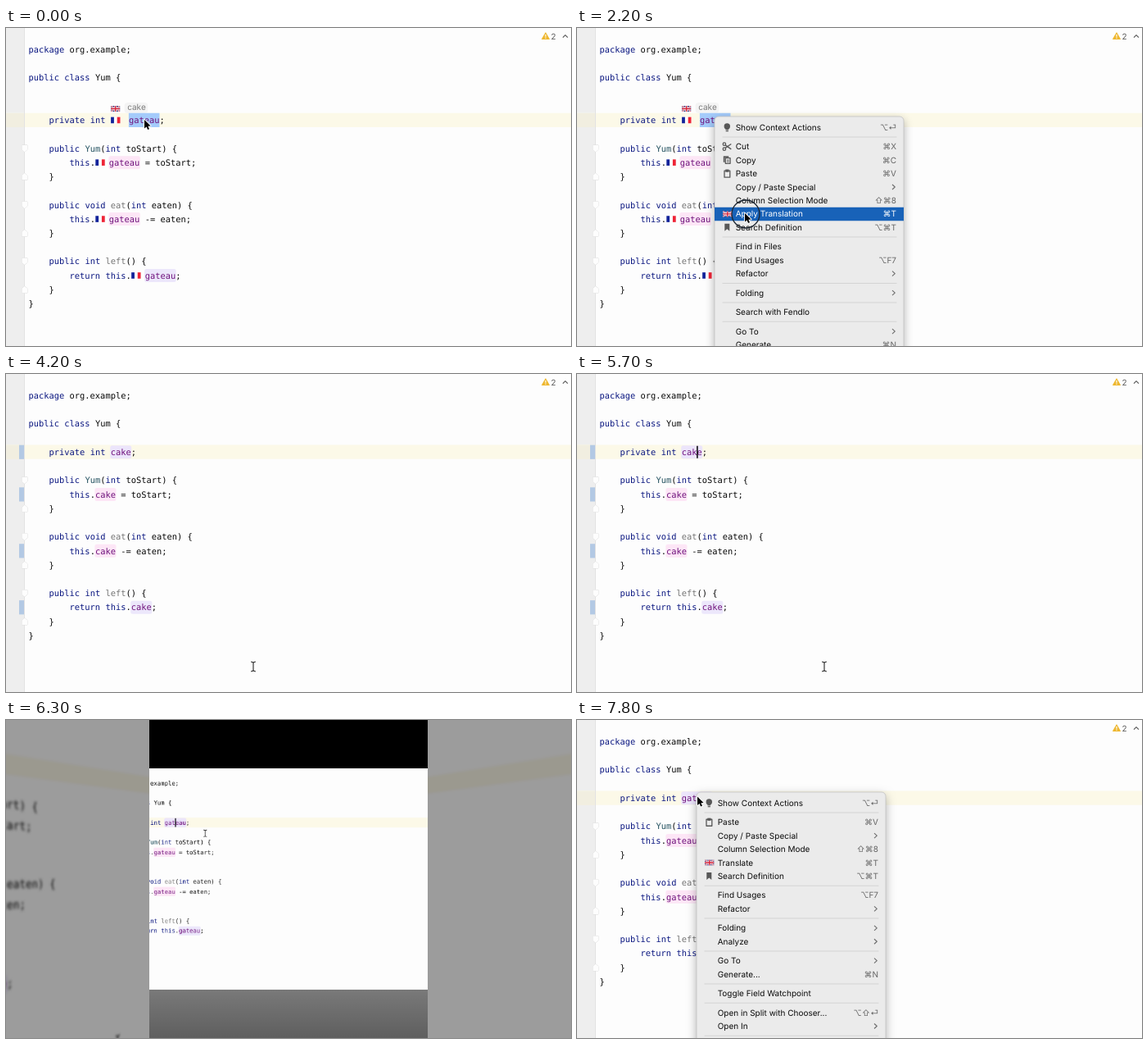
Animation of 690x388 px, one loop 8 s. Source, as an HTML page with a canvas:

```html
<!DOCTYPE html>
<html lang="en">
<head>
<meta charset="utf-8">
<title>Rename by translation</title>
<style>
  html, body { margin: 0; width: 100%; height: 100%; overflow: hidden; background: #fdfdfd; }
  canvas { display: block; width: 690px; height: 388px; }
</style>
</head>
<body>
<canvas id="stage"></canvas>
<script>
const W = 690, H = 388, LOOP = 8000;
const K = window.devicePixelRatio || 1;
const MONO = '10.4px "DejaVu Sans Mono", monospace';
const SANS = '10px Inter, "DejaVu Sans", sans-serif';
const CHAR = 6.262, ROW = 17.23, TOP = 26.3, LEFT = 27.5;

function surface(canvas) {
  canvas.width = W * K;
  canvas.height = H * K;
  const c = canvas.getContext('2d');
  c.scale(K, K);
  c.textRendering = 'geometricPrecision';
  return c;
}
const stage = surface(document.getElementById('stage'));
const oldPage = surface(document.createElement('canvas'));
const newPage = surface(document.createElement('canvas'));

// k keyword, c constructor, u unused method, D/W/R the renamed field
const CODE = [
  'k:package| org.example;', '',
  'k:public| |k:class| Yum {', '',
  '    |k:private| |k:int| |D:|;', '',
  '    |k:public| |c:Yum|(|k:int| toStart) {',
  '        |k:this|.|W:| = toStart;',
  '    }', '',
  '    |k:public| |k:void| |u:eat|(|k:int| eaten) {',
  '        |k:this|.|W:| -= eaten;',
  '    }', '',
  '    |k:public| |k:int| |u:left|() {',
  '        |k:return| |k:this|.|R:|;',
  '    }',
  '}'
];
const FIELD = '#6f127c';
const INK = { k: '#0a1680', c: '#245260', u: '#747474', D: FIELD, W: FIELD, R: FIELD };
const MARK = { D: '#ece5fb', W: '#fde6f6', R: '#ece7fb' };

// Menu rows: icon, label, shortcut; '>' is a submenu, null a separator
const FIELD_MENU = [
  ['bulb', 'Show Context Actions', '⌥⏎'], null,
  ['cut', 'Cut', '⌘X'], ['copy', 'Copy', '⌘C'], ['paste', 'Paste', '⌘V'],
  ['', 'Copy / Paste Special', '>'], ['', 'Column Selection Mode', '⇧⌘8'],
  ['flag', 'Apply Translation', '⌘T'], ['book', 'Search Definition', '⌥⌘T'], null,
  ['', 'Find in Files', ''], ['', 'Find Usages', '⌥F7'], ['', 'Refactor', '>'], null,
  ['', 'Folding', '>'], null,
  ['', 'Search with Fendlo', ''], null,
  ['', 'Go To', '>'], ['', 'Generate...', '⌘N']
];
const CARET_MENU = [
  ['bulb', 'Show Context Actions', '⌥⏎'], null,
  ['paste', 'Paste', '⌘V'], ['', 'Copy / Paste Special', '>'],
  ['', 'Column Selection Mode', '⇧⌘8'], ['flag', 'Translate', '⌘T'],
  ['book', 'Search Definition', '⌥⌘T'], null,
  ['', 'Find Usages', '⌥F7'], ['', 'Refactor', '>'], null,
  ['', 'Folding', '>'], ['', 'Analyze', '>'], null,
  ['', 'Go To', '>'], ['', 'Generate...', '⌘N'], null,
  ['', 'Toggle Field Watchpoint', ''], null,
  ['', 'Open in Split with Chooser...', '⌥⇧⏎'], ['', 'Open In', '>'], null
];

const PATH = [
  [0, 169, 112], [1300, 169, 112], [1900, 205, 226], [2500, 205, 226],
  [3000, 308, 288], [3200, 308, 288], [3700, 302, 357]
];
const PATH_BACK = [[6650, 199, 114], [7350, 147, 93.5]];

const clamp = (v) => Math.max(0, Math.min(1, v));
const smooth = (v) => v * v * (3 - 2 * v);

function along(path, t) {
  let at = path[0].slice(1);
  for (let i = 1; i < path.length; i++) {
    const [t0, x0, y0] = path[i - 1], [t1, x1, y1] = path[i];
    if (t >= t0) {
      const f = smooth(clamp((t - t0) / (t1 - t0)));
      at = [x0 + (x1 - x0) * f, y0 + (y1 - y0) * f];
    }
  }
  return at;
}

function box(c, x, y, w, h, fill, r = 0) {
  c.fillStyle = fill;
  c.beginPath();
  c.roundRect(x, y, w, h, r);
  c.fill();
}

function poly(c, pts, fill, stroke, width = 1, open) {
  c.beginPath();
  pts.forEach(([x, y], i) => i ? c.lineTo(x, y) : c.moveTo(x, y));
  if (!open) c.closePath();
  c.lineJoin = 'round';
  c.lineWidth = width;
  if (stroke) { c.strokeStyle = stroke; c.stroke(); }
  if (fill) { c.fillStyle = fill; c.fill(); }
}

function text(c, str, x, y, fill, font, align = 'left') {
  c.font = font;
  c.textAlign = align;
  c.fillStyle = fill;
  c.fillText(str, x, y);
}

function frenchFlag(c, x, y) {
  box(c, x, y, 11.4, 7.6, '#fff');
  box(c, x, y, 3.8, 7.6, '#12239a');
  box(c, x + 7.6, y, 3.8, 7.6, '#ee2436');
}

function britishFlag(c, x, y) {
  const w = 11.5, h = 7;
  c.save();
  c.beginPath();
  c.rect(x, y, w, h);
  c.clip();
  box(c, x, y, w, h, '#1f2f7c');
  for (const [color, lw] of [['#fff', 1.7], ['#d3233a', 0.7]]) {
    poly(c, [[x, y], [x + w, y + h]], null, color, lw, true);
    poly(c, [[x, y + h], [x + w, y]], null, color, lw, true);
  }
  for (const [color, s] of [['#fff', 2.6], ['#d3233a', 1.4]]) {
    box(c, x, y + (h - s) / 2, w, s, color);
    box(c, x + (w - s) / 2, y, s, h, color);
  }
  c.restore();
}

function foldIcon(c, y, up) {
  const s = up ? -1 : 1;
  poly(c, [[19.5, y - 4 * s], [26, y - 4 * s], [26, y + 1.5 * s], [22.7, y + 4.3 * s], [19.5, y + 1.5 * s]],
    '#fdfdfd', '#dfdfdf', 1);
}

// s: name, hints, selected, caret, changed
function drawEditor(c, s) {
  box(c, 0, 0, W, H, '#fdfdfd');
  box(c, 0, 0, 22, H, '#eeeeee');
  const rowY = (i) => TOP + ROW * (i + (s.hints && i > 3 ? 1 : 0));
  const current = rowY(4) - 8.6;
  box(c, 0, current, W, ROW, '#fcf9e8');
  box(c, 0, current, 22, ROW, '#f1eee0');
  box(c, 22, 0, 1, H, '#e2e2e2');

  CODE.forEach((line, i) => {
    const y = rowY(i);
    if (i > 5 && i < 17 && i % 2 === 0) foldIcon(c, y, i % 4 === 0);
    let x = LEFT;
    for (const part of line.split('|')) {
      const [, kind, body] = part.match(/^(?:([kcuDWR]):)?(.*)$/);
      const field = MARK[kind];
      const str = field ? s.name : body;
      const w = str.length * CHAR;
      if (field) {
        if (s.changed) box(c, 16, y - 8.6, 6, ROW, '#b3c9e4');
        if (s.hints) {
          frenchFlag(c, x + 0.4, y - 3.8);
          if (kind === 'D') {
            britishFlag(c, x + 0.2, y - 17.4);
            box(c, x + 17, y - 21.5, 28.5, 13, '#f4f4f4', 4);
            text(c, 'cake', x + 20.5, y - 12, '#7c7c7c', SANS);
          }
          x += kind === 'D' ? 22.2 : 16.9;
        }
        if (kind === 'D' && s.selected) box(c, x, y - 8.6, w, ROW, '#a4cbfb');
        else box(c, x - 0.5, y - 8, w + 1, 16, MARK[kind], 2.5);
      }
      text(c, str, x, y + 3.7, INK[kind] || '#080808', MONO);
      if (kind === 'D' && s.caret) box(c, x + 3 * CHAR - 0.3, y - 7.5, 1.5, 15, '#000');
      x += w;
    }
  });

  poly(c, [[659, 6], [663.3, 13.5], [654.7, 13.5]], '#eeb72f', '#eeb72f', 1.2);
  box(c, 658.4, 7.7, 1.2, 3, '#fff');
  box(c, 658.4, 11.6, 1.2, 1.2, '#fff');
  text(c, '2', 665.4, 13.6, '#5c5c5c', SANS);
  poly(c, [[680, 11.6], [683, 8.6], [686, 11.6]], null, '#5c5c5c', 1.2, true);
}

const GREY = '#585858';
const ICONS = {
  bulb(c, x, y) {
    c.fillStyle = GREY;
    c.beginPath();
    c.arc(x, y - 1.2, 3.7, 0, 7);
    c.fill();
    box(c, x - 1.8, y + 1, 3.6, 2.2, GREY);
    box(c, x - 1.6, y + 3.9, 3.2, 1.2, GREY);
  },
  cut(c, x, y) {
    poly(c, [[x - 2.5, y - 2], [x + 5, y + 3.2]], null, GREY, 1.3, true);
    poly(c, [[x - 2.5, y + 2], [x + 5, y - 3.2]], null, GREY, 1.3, true);
    for (const d of [-3, 3]) {
      c.beginPath();
      c.arc(x - 3.4, y + d, 1.7, 0, 7);
      c.stroke();
    }
  },
  copy(c, x, y) {
    box(c, x - 4.5, y - 4.8, 6.5, 7.5, GREY);
    box(c, x - 2.8, y - 3.2, 7.4, 8.2, '#ebebeb');
    c.strokeStyle = GREY;
    c.lineWidth = 1.3;
    c.strokeRect(x - 2, y - 2.4, 5.8, 6.6);
    box(c, x - 0.4, y - 0.4, 2.8, 1, GREY);
    box(c, x - 0.4, y + 1.6, 2.8, 1, GREY);
  },
  paste(c, x, y) {
    c.strokeStyle = GREY;
    c.lineWidth = 1.3;
    c.strokeRect(x - 3.3, y - 3.4, 6.8, 8);
    box(c, x - 2, y - 5, 4.2, 3.2, GREY);
  },
  flag(c, x, y) { britishFlag(c, x - 5.3, y - 3.5); },
  book(c, x, y) {
    poly(c, [[x - 3, y - 4.5], [x + 3, y - 4.5], [x + 3, y + 4.5], [x, y + 2], [x - 3, y + 4.5]], GREY);
  }
};

function drawMenu(c, items, x, y, [px, py], alpha = 1) {
  const w = 231;
  c.save();
  c.globalAlpha = alpha;
  c.shadowColor = 'rgba(0,0,0,0.32)';
  c.shadowBlur = 12 * K;
  c.shadowOffsetY = 4 * K;
  box(c, x, y, w, 340, '#ebebeb', 5);
  c.shadowColor = 'transparent';
  c.strokeStyle = '#c3c3c3';
  c.lineWidth = 0.8;
  c.stroke();
  let cy = y + 13.2;
  for (const item of items) {
    if (!item) {
      box(c, x + 9.5, cy - 5.2, 213, 1, '#d4d4d4');
      cy += 7;
      continue;
    }
    const [icon, label, keys] = item;
    const hot = px > x + 4 && Math.abs(py - cy) <= 8.22;
    if (hot) box(c, x, cy - 8.2, w, 16.45, '#1862b8');
    if (icon) ICONS[icon](c, x + 15.3, cy);
    text(c, label, x + 25.7, cy + 3.5, hot ? '#fff' : '#0c0c0c', SANS);
    if (keys === '>') {
      poly(c, [[x + 217, cy - 3], [x + 220.3, cy], [x + 217, cy + 3]], null, '#6c6c6c', 1.1, true);
    } else {
      text(c, keys, x + 222, cy + 3.5, hot ? '#fff' : '#666', SANS, 'right');
    }
    cy += 16.45;
  }
  c.restore();
}

function drawArrow(c, [x, y]) {
  const shape = [[0, 0], [0, 10.6], [2.5, 8.4], [4.1, 12], [6, 11.2], [4.4, 7.7], [7.6, 7.5]];
  poly(c, shape.map(([dx, dy]) => [x + dx, y + dy]), '#000', '#fff', 1.8);
}

function drawBeam(c, [x, y]) {
  for (const [color, lw] of [['#fff', 2.6], ['#222', 1.1]]) {
    poly(c, [[x, y - 5], [x, y + 5]], null, color, lw, true);
    for (const s of [-1, 1]) {
      poly(c, [[x - 2.8, y + 6 * s], [x, y + 5 * s], [x + 2.8, y + 6 * s]], null, color, lw, true);
    }
  }
}

function drawRing(c, [x, y], t, start) {
  if (t < start || t >= start + 220) return;
  c.strokeStyle = '#1c2530';
  c.lineWidth = 1.3;
  c.beginPath();
  c.arc(x + 1, y + 1, 17, 0, 7);
  c.stroke();
}

function drawBefore(c, t) {
  const at = along(PATH, t);
  const renamed = t >= 2600;
  drawEditor(c, {
    name: renamed ? 'cake' : 'gateau',
    hints: !renamed,
    selected: t < 3400,
    changed: renamed,
    caret: renamed && (t < 4200 || t >= 5700 || (t >= 4700 && t < 5200))
  });
  if (t >= 500 && t < 2500) drawMenu(c, FIELD_MENU, 168, 108, at, clamp((2500 - t) / 100));
  if (t < 2500) drawArrow(c, at); else drawBeam(c, at);
  drawRing(c, at, t, 400);
  drawRing(c, at, t, 2200);
}

function drawAfter(c, t) {
  const at = along(PATH_BACK, t);
  const menu = t >= 7500;
  drawEditor(c, { name: 'gateau', caret: !menu });
  if (menu) {
    drawMenu(c, CARET_MENU, 146, 88, at);
    drawArrow(c, at);
  } else drawBeam(c, at);
  drawRing(c, at, t, 7420);
}

// Two doors swing away on their outer hinges while the next page comes forward
function drawDoors(c, t) {
  const f = (1 - Math.cos(Math.PI * (t - 5750) / 900)) / 2;
  const cx = W / 2, cy = H / 2, depth = 868;
  drawBefore(oldPage, t);
  oldPage.filter = `blur(${1.6 * f * K}px)`;
  oldPage.drawImage(oldPage.canvas, 0, 0, W, H);
  oldPage.filter = 'none';
  drawAfter(newPage, t);
  box(c, 0, 0, W, H, '#000');

  const k = depth / (depth + 1320 * Math.pow(1 - f, 1.12));
  const w = W * k, h = H * k, x = cx - w / 2, floor = cy + h / 2;
  c.drawImage(newPage.canvas, x, cy - h / 2, w, h);
  c.save();
  c.translate(0, floor);
  c.scale(1, -1);
  c.globalAlpha = 0.48;
  c.drawImage(newPage.canvas, x, -h, w, h);
  c.restore();
  const fade = c.createLinearGradient(0, floor, 0, floor + h);
  fade.addColorStop(0, 'rgba(0,0,0,0)');
  fade.addColorStop(1, '#000');
  box(c, x, floor, w, h, fade);

  const angle = 77 * Math.pow(f, 0.85) * Math.PI / 180;
  const near = 538 * Math.pow(f, 0.745);
  const cos = Math.cos(angle), sin = Math.sin(angle);
  const shade = `rgba(0,0,0,${0.57 * f})`;
  for (let i = 0; i < cx; i++) {
    const s = i + 0.5 - cx;
    const u = (s * (depth - near) + cx * depth) / (depth * cos - s * sin);
    if (u < 0 || u > cx) continue;
    const m = depth / (depth - near + u * sin);
    const span = Math.max(0.2, cos / m);
    for (const [sx, dx] of [[Math.min(u, cx - span), i], [Math.max(cx, W - u - span), W - 1 - i]]) {
      c.drawImage(oldPage.canvas, sx * K, 0, span * K, H * K, dx, cy - cy * m, 1, H * m);
      c.fillStyle = shade;
      c.fillRect(dx, 0, 1, H);
    }
  }
}

const origin = performance.now();
function frame() {
  const t = (performance.now() - origin) % LOOP;
  if (t < 5750) drawBefore(stage, t);
  else if (t < 6650) drawDoors(stage, t);
  else drawAfter(stage, t);
  requestAnimationFrame(frame);
}
frame();
</script>
</body>
</html>
```
